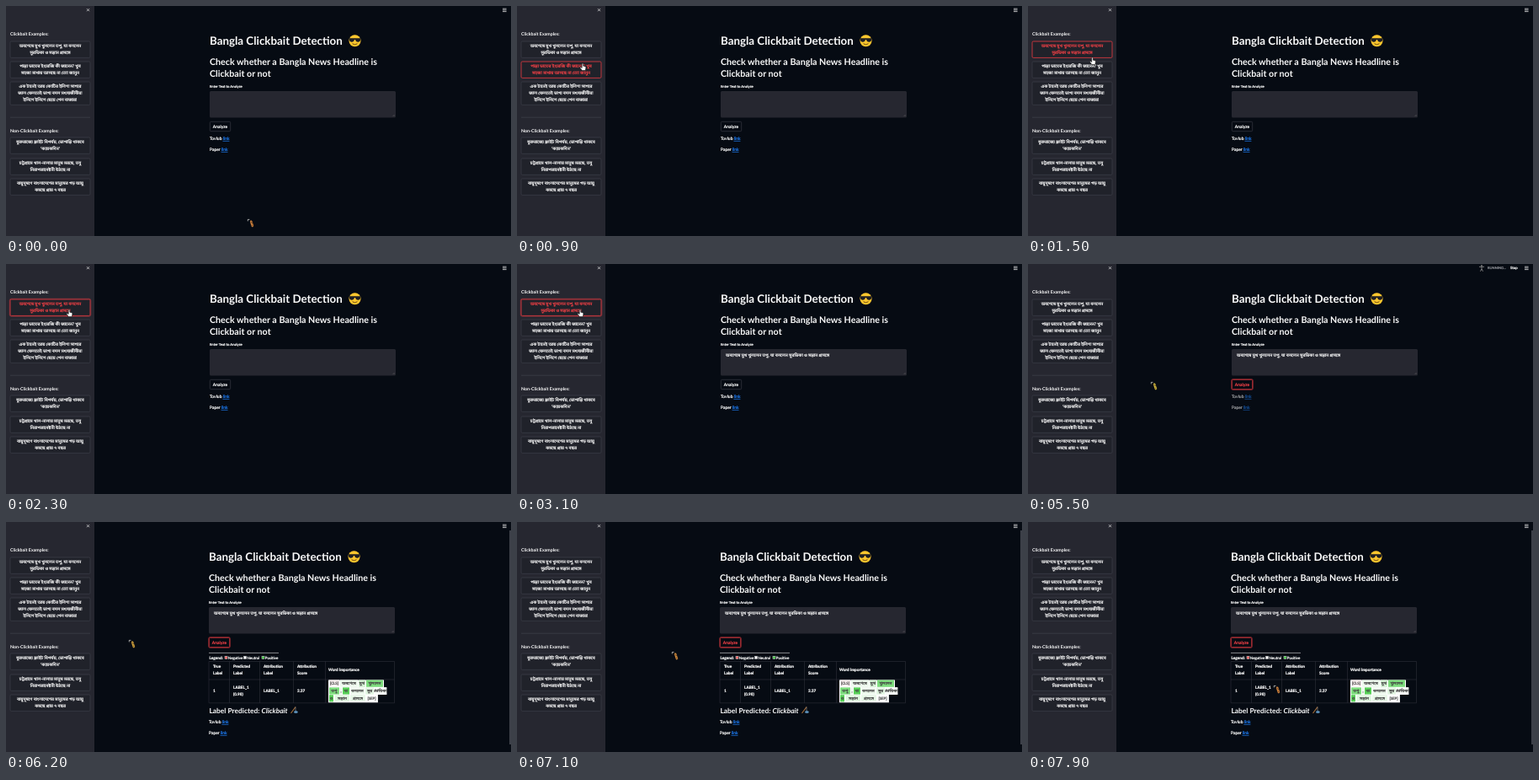
An HTML page that plays this animation: 600 px wide and 273 px high, repeating every 8 s.

```html
<!DOCTYPE html>
<html lang="bn">
<meta charset="utf-8">
<style>
  html, body { margin: 0; height: 100%; overflow: hidden; background: #060b13; }
  svg { display: block; width: 600px; height: 273px; color: #fafafa; fill: currentColor;
    font-family: Lato, "Noto Sans", "Noto Sans Bengali", sans-serif; text-rendering: geometricPrecision; }
  .small { stroke: currentColor; stroke-width: .22; }
  .button rect { fill: #0a0d142e; stroke: #42444e; stroke-width: .6; }
  .button .glow { fill: none; stroke: none; }
  .hot { color: #f04046; }
  .hot rect { stroke: #e83c42; stroke-width: .8; }
  .focus .glow { stroke: #f0404659; stroke-width: 1; }
  .link { color: #1c78ec; text-decoration: underline; }
  .grid { fill: none; stroke: #343740; stroke-width: .5; }
</style>
<body>
<script>
// Small type gets a hairline outline so that it stays legible
const text = (x, y, size, str, attrs = '') =>
  `<text x="${x}" y="${y}" font-size="${size}" ${size <= 5 ? 'class="small"' : ''} ${attrs}>${str}</text>`;
const rect = (x, y, w, h, attrs = '') => `<rect x="${x}" y="${y}" width="${w}" height="${h}" ${attrs}/>`;
const bold = 'font-weight="700"', middle = 'text-anchor="middle"';

const headline = ['অবশেষে মুখ খুললেন তপু, যা বললেন', 'সুরভিকা ও সন্তান প্রসঙ্গে'];
const buttons = [
  [5, 42, 95, headline],
  [5, 66, 95, ['পান্তা ভাতের ইংরেজি কী জানেন? খুব', 'সহজ! মাথায় আসছে না তো! জানুন']],
  [5, 90, 95, ['এক টানেই আয় কোটির ইলিশ! সাগরে', 'জাল ফেলতেই ভাগ্য বদল মৎস্যজীবীর!', 'ইলিশে ইলিশে ছেয়ে গেল বাজার!']],
  [5, 156, 95, ['যুক্তরাজ্যে ফ্লাইট বিপর্যয়, ভোগান্তি থাকবে', '‘কয়েকদিন’']],
  [5, 181, 95, ['চট্টগ্রামে খাল-নালায় মানুষ মরছে, তবু', 'নিরাপত্তাবেষ্টনী উঠছে না']],
  [5, 205, 95, ['বায়ুদূষণে বাংলাদেশের মানুষের গড় আয়ু', 'কমছে প্রায় ৭ বছর']],
  [242.3, 137.3, 24.4, ['Analyze']],
].map(([x, y, w, lines]) => ({ x, y, w, h: 3.4 + lines.length * 8, lines }));

const button = ({ x, y, w, h, lines }) => `<g class="button">
  ${rect(x - .8, y - .8, w + 1.6, h + 1.6, 'rx="2" class="glow"')}${rect(x, y, w, h, 'rx="1.3"')}
  ${lines.map((s, i) => text(x + w / 2, y + 7.4 + i * 8, 5, s, middle)).join('')}</g>`;

const linkRow = (y, label) => text(242, y, 5, `${label} <tspan class="link">link</tspan>`);

// Word importance tokens: x, row, width, shade, word
const tokens = [
  [384, 0, 12, '#fff4f4', '[CLS]'], [397, 0, 21, '#edf9ed', 'অবশেষে'], [419, 0, 8, '#d5f2d5', 'মুখ'], [428, 0, 20, '#7ddc7d', 'খুললেন'],
  [384, 1, 12, '#7ddc7d', 'তপু'], [397, 1, 2, '#e6f7e6', ','], [400, 1, 8, '#58d058', 'যা'], [409, 1, 17, '#edf9ed', 'বললেন'],
  [427, 1, 10, '#e1f5e1', 'সুর'], [438, 1, 14, '#f8fcf8', '##ভিকা'],
  [384, 2, 5, '#58d058', 'ও'], [391, 2, 17, '#e1f5e1', 'সন্তান'], [409, 2, 18, '#e8f7e8', 'প্রসঙ্গে'], [428, 2, 13, '#fff', '[SEP]'],
].map(([x, row, w, shade, word]) => rect(x, 187.6 + row * 8.8, w, 8.2, `fill="${shade}"`) +
  text(x + w / 2, 193.4 + row * 8.8, word[0] == '[' ? 4.4 : 4.8, word, middle + ' color="#444"')).join('');

const headers = [[246, 'True', 'Label'], [270, 'Predicted', 'Label'], [306, 'Attribution', 'Label'],
  [346, 'Attribution', 'Score'], [383, 'Word Importance', '']]
  .map(([x, a, b]) => text(x, b ? 173 : 177, 4.7, a, bold) + text(x, 181, 4.7, b, bold)).join('');

const legend = [[260, '#ef5a5a', 'Negative'], [282.6, '#fff', 'Neutral'], [304, '#3cc43c', 'Positive']]
  .map(([x, c, s]) => rect(x, 159.4, 3, 3, `fill="${c}" stroke="#ddd" stroke-width=".5"`) + text(x + 3.8, 162.8, 4.5, s)).join('');

document.body.innerHTML = `<svg viewBox="0 0 600 273">
  ${rect(0, 0, 105, 273, 'fill="#262730"')}
  <path d="M96 3.2l3 3m0-3l-3 3M590 3.2h4.6m-4.6 1.7h4.6m-4.6 1.7h4.6" stroke="#ddd" stroke-width=".8"/>
  <path d="M5 132.2h95" stroke="#464852" stroke-width=".6"/>
  ${text(5, 35, 5.3, 'Clickbait Examples:', bold)}
  ${text(5, 150, 5.3, 'Non-Clickbait Examples:', bold)}
  ${buttons.slice(0, 6).map(button).join('')}
  <g id="running">
    <path d="M536 3.3h6m-3-.6v3m0 0l-1.5 3m1.5-3l1.5 3" stroke="#888" stroke-width=".9" fill="none"/>
    <circle cx="539" cy="1.9" r=".9" fill="#888"/>
    ${text(546, 6.4, 4.1, 'RUNNING...', 'color="#8a8c92"')}${text(573, 6.4, 4.3, 'Stop')}
  </g>
  ${rect(598, 10, 2, 254, 'id="scrollbar" fill="#3c3f48"')}
  <g id="main">
    ${text(242, 46, 13.35, 'Bangla Clickbait Detection', bold)}
    <circle cx="414.5" cy="41.3" r="7" fill="#fcc62e"/>
    <path d="M407.6 38.3h13.8l-.6 3.2q-2.6 2.6-5.2 0l-.5-1.4h-1.2l-.5 1.4q-2.6 2.6-5.2 0z" fill="#1d1d22"/>
    <path d="M411.5 44.7q3 2.2 6 0" fill="none" stroke="#63400e" stroke-width=".9"/>
    ${text(242, 70, 10.7, 'Check whether a Bangla News Headline is', bold)}
    ${text(242, 83.5, 10.7, 'Clickbait or not', bold)}
    ${text(242, 97, 4.2, 'Enter Text to Analyze')}
    ${rect(242, 101, 221, 31.5, 'rx="1.5" fill="#262730"')}
    <path d="M459.5 131l2-2m-.8 2l.8-.8" stroke="#777" stroke-width=".4"/>
    ${text(248, 110, 5, headline.join(' '), 'id="entry"')}
    ${button(buttons[6])}
    <g id="links">${linkRow(159, 'Tovlub')}${linkRow(172, 'Paper')}</g>
  </g>
  <g id="result">
    <path d="M241 155.4h83" stroke="#ddd" stroke-width=".6"/>
    ${text(241.5, 162.8, 4.7, 'Legend:', bold)}${legend}
    <path class="grid" d="M241 165.5h220.5v49.3H241zM241 187h220.5M265.5 165.5v49.3M301.5 165.5v49.3M341.5 165.5v49.3M379.5 165.5v49.3"/>
    ${headers}
    ${[[246, 202, '1'], [270, 198, 'LABEL_1'], [270, 206, '(0.98)'], [306, 202, 'LABEL_1'], [346, 202, '2.37']]
      .map(([x, y, s]) => text(x, y, 4.7, s, bold)).join('')}
    <path d="M383 187.4h66v8.8h3.4v8.8h-10.5v9.2H383z" fill="#fff"/>
    ${tokens}
    ${text(241.5, 226.5, 8.4, 'Label Predicted: <tspan font-style="italic">Clickbait</tspan>', bold)}
    <path d="M338.5 227l5.5-7.5" stroke="#a9713c" stroke-width="1.1"/>
    <path d="M344 219.5v6" stroke="#bbb" stroke-width=".5"/>
    <ellipse cx="344.4" cy="225.5" rx="2.4" ry="1.5" fill="#5b8fb8"/>
  </g>
  <g id="cursor">
    <g id="arrow">
      <path d="M.3 2.4V.4H2.4" fill="none" stroke="#ccc" stroke-width=".8"/>
      <path id="pen" d="M4.2 2.8l1.7 5.2" stroke-width="2.6" stroke-linecap="round"/>
      <path d="M3.6 3l2.8 2.4M5 6.8l1.6 1.4" stroke="#47301c" stroke-width=".8"/>
    </g>
    <path id="hand" d="M-.8 .6q.8-1.2 1.6 0V3.2l2.3.5q.9.3.8 1.5L3.3 8.6H-.6L-3 5.4q0-1.3 1.1-.7l1.1.8z" fill="#fff" stroke="#111" stroke-width=".6"/>
  </g>
</svg>`;

// Time, x and y of the pointer tip
const path = [[0, 287, 253], [100, 287, 253], [800, 78, 68], [1300, 78, 68], [1700, 75, 54], [3300, 75, 54],
  [3800, 252, 144], [4000, 252, 144], [4200, 240, 156], [5000, 146, 140], [6700, 146, 140], [7900, 292, 194], [8000, 292, 194]];

function pointer(t) {
  const i = path.findIndex(p => p[0] > t), [t0, x0, y0] = path[i - 1], [t1, x1, y1] = path[i];
  const k = (t - t0) / (t1 - t0), e = k * k * (3 - 2 * k);
  return [x0 + (x1 - x0) * e, y0 + (y1 - y0) * e];
}

const $ = id => document.getElementById(id);
const show = (id, opacity) => $(id).setAttribute('opacity', +opacity);
const ramp = (t, from, length) => Math.max(0, Math.min(1, (t - from) / length));
const buttonNodes = document.querySelectorAll('.button');

function draw(now) {
  const t = now % 8000, [x, y] = pointer(t), done = t >= 5700;
  let hand = false;
  buttons.forEach((b, i) => {
    const over = x > b.x && x < b.x + b.w && y > b.y && y < b.y + b.h;
    const focus = i == 0 ? t >= 2200 && t < 3900 : i == 6 && t >= 3900;
    hand ||= over;
    buttonNodes[i].classList.toggle('hot', over || focus);
    buttonNodes[i].classList.toggle('focus', focus);
  });
  $('cursor').setAttribute('transform', `translate(${x} ${y})`);
  show('hand', hand);
  show('arrow', !hand);
  $('pen').setAttribute('stroke', `hsl(${44 - 16 * Math.cos(t * Math.PI / 4000)} 60% 52%)`);
  show('entry', t >= 2700);
  show('running', t < 3100 ? .6 * ramp(t, 2600, 200) : done ? 0 : ramp(t, 4100, 400));
  show('links', done ? 1 : 1 - .4 * ramp(t, 4500, 400));
  show('result', done);
  show('scrollbar', done);
  $('main').setAttribute('transform', `translate(${done ? -1 : 0} 0)`);
  $('links').setAttribute('transform', `translate(0 ${done ? 80 : 0})`);
  requestAnimationFrame(() => draw(performance.now()));
}
draw(0);
</script>
</body>
</html>
```
